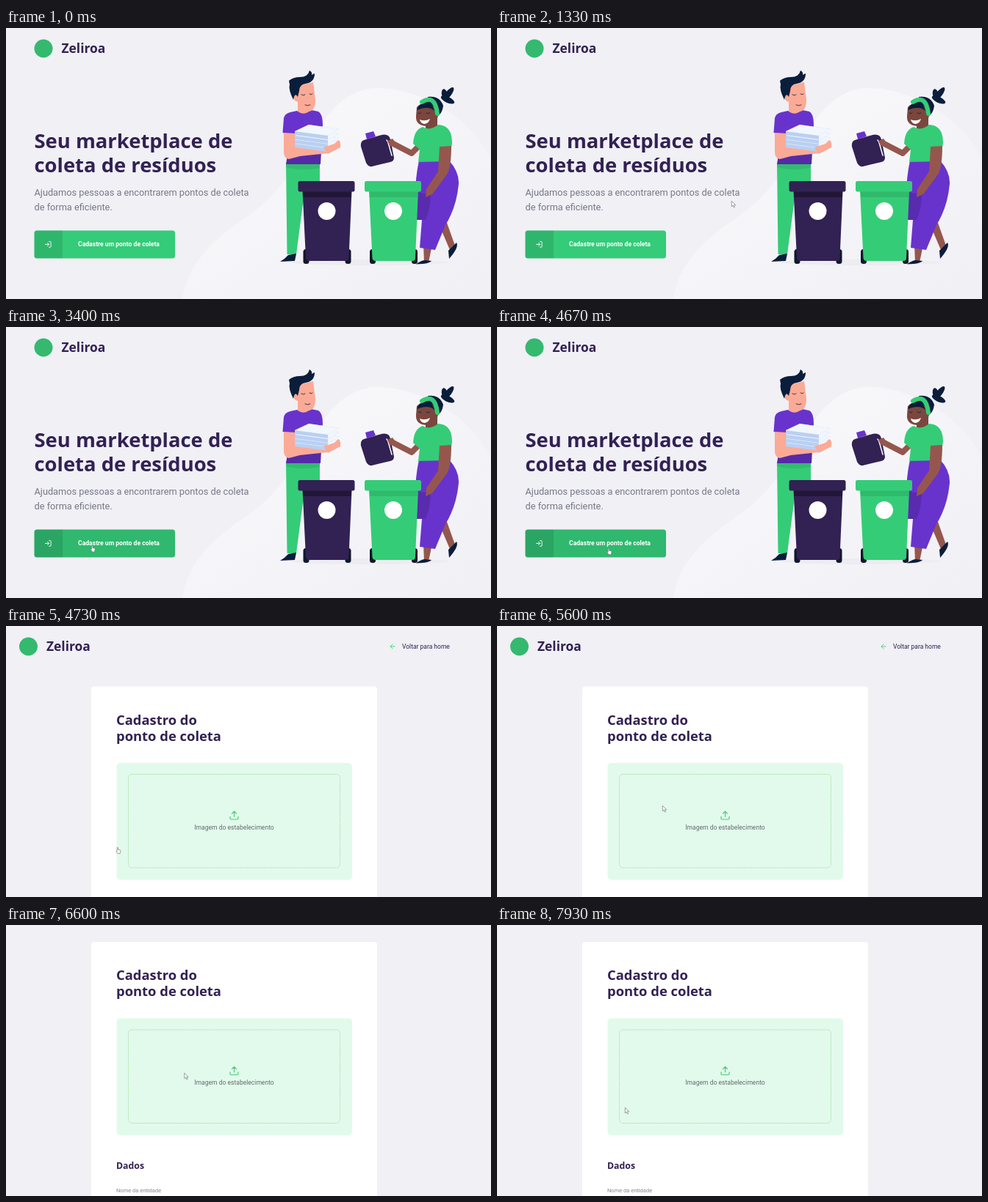
An HTML page that plays this animation: 660 px wide and 370 px high, repeating every 8 s.

```html
<!DOCTYPE html>
<html lang="pt-BR">
<head>
<meta charset="utf-8">
<style>
  html, body { margin: 0; width: 100%; height: 100%; overflow: hidden; background: #f0f0f5; }
  svg { display: block; width: 100%; height: 100%; }
  text { font-family: Roboto, sans-serif; }
  .title { font-family: "Open Sans", "Noto Sans", sans-serif; font-weight: 700; fill: #322153; }
  .line { fill: none; stroke-linecap: round; stroke-linejoin: round; }
  .green { fill: #35cc77; --shade: .09; }
  .purple { fill: #6833cc; }
  .dark { fill: #322153; --shade: .35; }
  .navy { fill: #0a1d3b; }
  .skin { fill: #fbaa96; }
  .brown { fill: #95574d; }
  .face { fill: #7b463e; }
</style>
</head>
<body>
<svg viewBox="0 0 660 370">
  <defs>
    <linearGradient id="glow" x1=".3" y1=".2" x2="1" y2=".9">
      <stop offset="0" stop-color="#f8f8fb"/>
      <stop offset="1" stop-color="#f0f0f5"/>
    </linearGradient>
    <g id="brand">
      <circle cx="12.5" cy="28" r="12.5" fill="#34b96f"/>
      <text class="title" x="37" y="34" font-size="17.4">Zeliroa</text>
    </g>
    <g id="bin">
      <g fill="#10182b">
        <rect x="7" y="93" width="8" height="20" rx="3.5"/>
        <rect x="64" y="93" width="8" height="20" rx="3.5"/>
      </g>
      <path d="M6 13H73L69 105Q69 109 65 109H15Q11 109 10.500 105Z"/>
      <path d="M6.300 14H72.700L72.300 22H6.700Z" fill="#000" opacity="var(--shade)" style="opacity: var(--shade)"/>
      <rect width="77" height="14.500" rx="2.500"/>
      <circle cx="39" cy="41" r="12" fill="#fff"/>
    </g>
    <g id="sheet">
      <path d="M393 141L412 132L454 138L438 147V152L393 146Z" fill="#b9d0f2"/>
      <path d="M393 141L412 132L454 138L438 147Z" fill="#f2f6fd"/>
    </g>
  </defs>

  <g id="home">
    <path d="M240 370C248 318 284 288 330 256C382 220 405 166 425 138C449 98 480 80 510 82C566 84 632 122 660 178V370Z" fill="url(#glow)"/>
    <ellipse cx="495" cy="320" rx="108" ry="4" fill="#ececf1"/>
    <use href="#brand" x="38.500"/>
    <text class="title" x="38.500" y="163.800" font-size="27.4">Seu marketplace de</text>
    <text class="title" x="38.500" y="197" font-size="27.4">coleta de resíduos</text>
    <g font-size="12.78" fill="#777789">
      <text x="38.500" y="229">Ajudamos pessoas a encontrarem pontos de coleta</text>
      <text x="38.500" y="249">de forma eficiente.</text>
    </g>
    <rect id="button" x="38.500" y="276.500" width="191.500" height="38" rx="3.500"/>
    <path d="M77 276.500H42Q38.500 276.500 38.500 280V311Q38.500 314.500 42 314.500H77Z" opacity=".1"/>
    <path class="line" transform="translate(52.300 290.400) scale(.42)" stroke="#fff" stroke-width="2.200"
      d="M15 3h4a2 2 0 0 1 2 2v14a2 2 0 0 1-2 2h-4M10 17l5-5-5-5M15 12H3"/>
    <text x="153.500" y="298.300" font-size="8.6" font-weight="700" fill="#fff" text-anchor="middle">Cadastre um ponto de coleta</text>

    <!-- man -->
    <path class="green" d="M381 184H427V225H406L395 309H382.500Z"/>
    <path d="M381 186H427V191Q402 196 381 190Z" opacity=".08"/>
    <path class="navy" d="M395 308L393 318L373 319Q379 316 384 310Z"/>
    <path class="skin" d="M397 98H414V117Q405 122 397 116Z"/>
    <path class="purple" d="M396 113Q405 121 415 112L425 114Q431 117 431 132L428 186H381L388 145L376.500 143L378 123Q379 117 387 115Z"/>
    <path d="M383 172L429 164L428 186H381Z" opacity=".18"/>
    <path class="skin" d="M378 143L395 144L394 163L410 161L441 158L452 155L455 163L438 171L400 175L385 179Q378 178 378 169Z"/>
    <path class="skin" d="M394 80L418 74L421 98Q421 114 411 114Q400 113 398 101Q391 100 391 93Q391 88 395 89Z"/>
    <path class="navy" d="M391 98Q384 84 386 77L385 72Q391 67 400 67Q411 67 413 58Q417 60 416 64L420 62Q420 74 408 76Q399 77 399 86L397 94Q393 87 391 98Z"/>
    <path class="line" stroke="#0a1d3b" stroke-width=".8" d="M402 91q3 2 5 0M413 90q2 2 4 0M407 105q4 2 7 0"/>
    <use href="#sheet" y="17"/><use href="#sheet" y="11.500"/><use href="#sheet" y="6"/><use href="#sheet"/>
    <path class="skin" d="M432 163L447 158L452 153Q456 154 455 163L438 172Z"/>

    <!-- woman -->
    <path class="brown" d="M590 270L600 266L611 297L604 303Z"/>
    <path class="navy" d="M602 304L613 293Q617 299 603 315Z"/>
    <path class="brown" d="M568 296H580L575 320H569Z"/>
    <path class="navy" d="M569 317L579 318Q576 322 558 322.500Q562 319 569 317Z"/>
    <path class="purple" d="M562 181L602 180Q617 196 616 213Q613 245 598 269L584 303L563 300L566 262H557V230Q557 204 562 181Z"/>
    <path d="M557 222Q570 230 577 222Q580 240 571 262H557Z" opacity=".14"/>
    <path class="line" stroke="#95574d" stroke-width="8" d="M523 156L552 171L564 159"/>
    <path class="face" d="M571 124H587V138Q578 143 571 137Z"/>
    <path class="green" d="M567 135Q577 141 588 132Q603 133 606 147Q608 156 606 163L601 182L561 183L563 166L554 158Q555 139 567 135Z"/>
    <path class="brown" d="M590 162L606 161Q606 190 600 200L580 227L571 231L572 220L588 196Z"/>
    <g class="navy">
      <path d="M574 94Q590 92 595 106Q594 116 587 121L578 112Z"/>
      <ellipse cx="597" cy="91" rx="4" ry="8" transform="rotate(-12 597 91)"/>
      <ellipse cx="602" cy="90" rx="4" ry="11" transform="rotate(38 602 90)"/>
      <ellipse cx="601" cy="98" rx="4" ry="10" transform="rotate(-65 601 98)"/>
    </g>
    <path class="face" d="M559 108Q566 101 578 103L588 116Q588 134 572 134Q557 133 558 120Z"/>
    <path class="navy" d="M559 112Q562 101 577 100L584 114Q576 105 559 112Z"/>
    <path class="line" stroke="#35cc77" stroke-width="6" d="M566 101Q584 90 587 117"/>
    <path d="M563 125Q570 128 577 124Q575 131 569 131Q564 130 563 125Z" fill="#fff"/>
    <path class="line" stroke="#0a1d3b" stroke-width=".8" d="M561 116q2 2 4 0M572 116q3 2 5 0"/>

    <!-- jug -->
    <path class="purple" d="M489 144L500 141L503 148L491 152Z"/>
    <path class="dark" d="M487 153L511 146Q521 144 523 152L528 177Q528 182 523 183L498 189Q493 190 490 184L483 162Q482 155 487 153Z"/>
    <path class="line" stroke="#f5f5f9" stroke-width="1.600" d="M518 153Q520 155 521 160L525 174"/>
    <path class="brown" d="M519 154L526 151L531 158L523 162Z"/>

    <use href="#bin" class="dark" x="397.500" y="209"/>
    <use href="#bin" class="green" x="488" y="209"/>
  </g>

  <g id="form">
    <use href="#brand" x="18"/>
    <path class="line" transform="translate(520.900 22.800) scale(.43)" stroke="#34cb79" stroke-width="2"
      d="M19 12H5M12 19l-7-7 7-7"/>
    <text class="dark" x="539" y="31" font-size="8.5">Voltar para home</text>
    <rect x="116" y="82.500" width="389" height="500" rx="4" fill="#fff"/>
    <text class="title" x="150" y="134.500" font-size="18.4">Cadastro do</text>
    <text class="title" x="150" y="156.500" font-size="18.4">ponto de coleta</text>
    <rect x="150.500" y="187" width="320.500" height="159.500" rx="5" fill="#e1faec"/>
    <rect x="166.500" y="202.500" width="288" height="127.500" rx="5" fill="none" stroke="#a8dc9c" stroke-width=".8" stroke-dasharray="2 1"/>
    <path class="line" transform="translate(303.200 251.200) scale(.61)" stroke="#4ecb79" stroke-width="2"
      d="M21 15v4a2 2 0 0 1-2 2H5a2 2 0 0 1-2-2v-4M17 8l-5-5-5 5M12 3v12"/>
    <text x="310.500" y="277.500" font-size="8.55" fill="#666b6b" text-anchor="middle">Imagem do estabelecimento</text>
    <text class="title" x="150" y="392" font-size="12.3">Dados</text>
    <text x="150" y="424" font-size="7.5" fill="#85858f">Nome da entidade</text>
  </g>

  <g id="cursor" fill="#fff" stroke="#777" stroke-width=".7" stroke-linejoin="round">
    <path id="arrow" d="M.3.300V7.800L2.100 6.200L3.300 9L4.600 8.400L3.400 5.700H5.700Z"/>
    <path id="hand" d="M1.500.800Q2.600.100 2.900 1.200V3.600L5.800 4.300Q6.400 4.600 6.200 5.600L5.500 9H2.400L.3 5.900Q.3 5 1.500 5.500Z"/>
  </g>
</svg>
<script>
const $ = id => document.getElementById(id);
const LOOP = 8000, STEP = 1000 / 15;

// time, x, y
const path = [
  [800, 236, 352], [1333, 319, 236], [1667, 319, 236], [2533, 160, 258],
  [2733, 139, 264], [3400, 115, 298], [3733, 92, 299], [3800, 92, 299],
  [4000, 150, 302], [5200, 149.5, 301.5], [5600, 225, 245], [5733, 225, 245],
  [5867, 226, 245], [6267, 228, 242], [6733, 246, 192], [7067, 246, 192],
  [7200, 250, 189], [7600, 250, 189], [7933, 174, 249]
];
// time, offset
const scroll = [[5733, 0], [5800, 30], [5867, 52.5], [5933, 57], [6000, 59], [6133, 59.5]];

const linear = u => u;
const smooth = u => u * u * (3 - 2 * u);

function at(keys, t, ease) {
  if (t <= keys[0][0]) return keys[0].slice(1);
  const i = keys.findIndex(k => k[0] > t);
  if (i < 0) return keys[keys.length - 1].slice(1);
  const a = keys[i - 1], b = keys[i];
  const u = ease((t - a[0]) / (b[0] - a[0]));
  return a.slice(1).map((v, j) => v + (b[j + 1] - v) * u);
}

const show = (id, on) => $(id).setAttribute("visibility", on ? "inherit" : "hidden");

function draw(now) {
  const t = Math.floor((now % LOOP + 4) / STEP) * STEP + 0.5;
  const home = t < 4730;
  show("home", home);
  show("form", !home);
  $("form").setAttribute("transform", `translate(0 ${-at(scroll, t, linear)[0]})`);

  const hover = Math.min(1, Math.max(0, (t - 3000) / 200));
  const mix = (a, b) => Math.round(a + (b - a) * hover);
  $("button").setAttribute("fill", `rgb(${mix(52, 47)},${mix(203, 184)},${mix(121, 110)})`);

  const pointing = t > 3000 && t < 5130;
  $("cursor").setAttribute("transform", `translate(${at(path, t, smooth)})`);
  show("cursor", t >= 800);
  show("arrow", !pointing);
  show("hand", pointing);
}

function tick() {
  draw(performance.now());
  requestAnimationFrame(tick);
}
tick();
</script>
</body>
</html>
```
